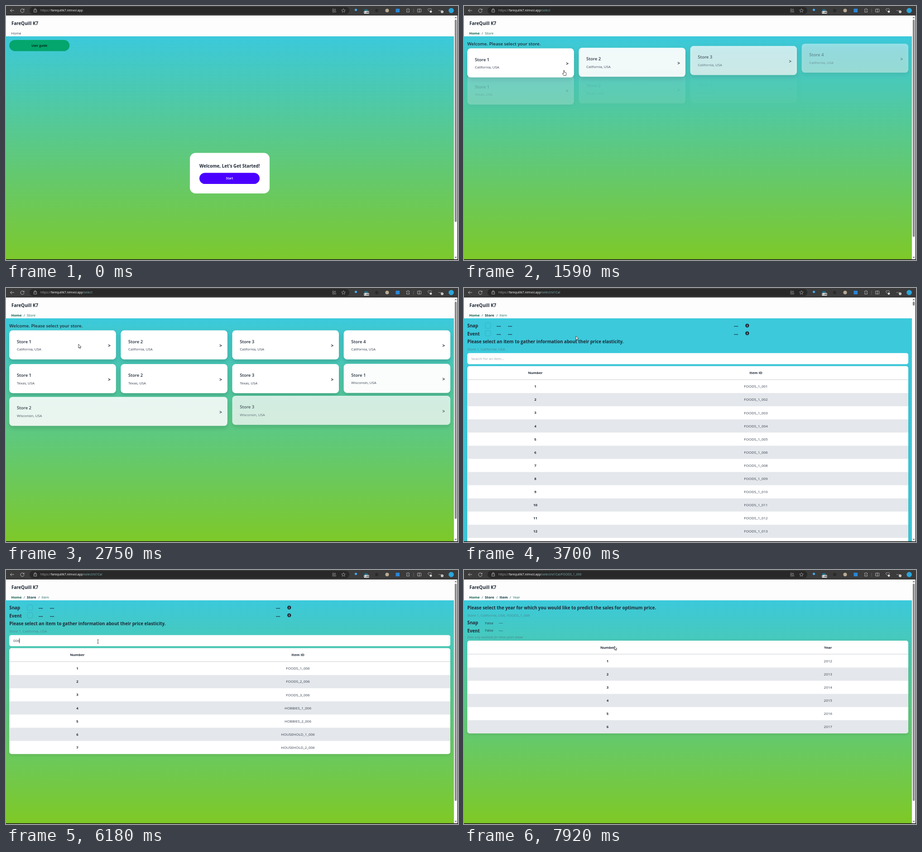
Recreate the animation shown at these times as an HTML page with a canvas. Size 998x561 px, loop 8 s.

```html
<!DOCTYPE html>
<html lang="en">
<head>
<meta charset="utf-8">
<title>Store price demo</title>
<style>
html, body { margin: 0; width: 100%; height: 100%; overflow: hidden; background: #3b3b3b; }
canvas { display: block; }
</style>
</head>
<body>
<canvas id="stage" width="998" height="561"></canvas>
<script>
const c = document.getElementById('stage').getContext('2d');
const LOOP = 8000, INK = '#1f2937', CYAN = '#3bc9db', LIME = '#82c91e', MUTED = '#4b8791';
const BODY = 7.8, TITLE = 9.75, ROW = 29.07;
const SELECT_AT = 980, ITEMS_AT = 3040, YEARS_AT = 7390;

// Text is placed by the middle of its capitals.
function text(s, x, y, size = BODY, color = INK, weight = 400, align = 'left') {
  c.font = `${weight} ${size}px "Open Sans", "Noto Sans", sans-serif`;
  c.textAlign = align;
  c.fillStyle = color;
  c.fillText(s, x, y + size * 0.36);
  return c.measureText(s).width;
}
function rect(x, y, w, h, color) {
  c.fillStyle = color;
  c.fillRect(x, y, w, h);
}
function box(x, y, w, h, r, color) {
  c.beginPath();
  c.roundRect(x, y, w, h, r);
  c.fillStyle = color;
  c.fill();
}
function disc(x, y, r, color) {
  c.beginPath();
  c.arc(x, y, r, 0, 7);
  c.fillStyle = color;
  c.fill();
}
function shape(d, x, y, fill, stroke, width = 0.9) {
  c.save();
  c.translate(x, y);
  const p = new Path2D(d);
  if (fill) { c.fillStyle = fill; c.fill(p); }
  if (stroke) { c.strokeStyle = stroke; c.lineWidth = width; c.stroke(p); }
  c.restore();
}
function withShadow(blur, dy, alpha, draw) {
  c.save();
  c.shadowColor = `rgba(0,0,0,${alpha})`;
  c.shadowBlur = blur;
  c.shadowOffsetY = dy;
  draw();
  c.restore();
}
const smooth = u => { u = Math.min(1, Math.max(0, u)); return u * u * (3 - 2 * u); };

function browserBar(path) {
  const line = '#c8c8c8';
  rect(0, 0, 998, 21, '#3b3b3b');
  box(52, 2, 706, 16, 8, '#282828');
  shape('M4.5 0H-4M-.5-3.5L-4 0L-.5 3.5', 13.5, 10, null, line);
  shape('M3.6-1.5A4 4 0 1 0 4 .8M4-4V-1.2H1.2', 36, 10, null, line);
  shape('M-3-1H3V4H-3ZM-1.6-1V-2.4A1.6 1.6 0 0 1 1.6-2.4V-1M0 1V2', 64.5, 9.5, null, line, 0.8);
  let x = 76;
  x += text('https://', x, 10, 6.8, '#a8a8a8');
  x += text('farequillk7.nimvol.app', x, 10, 6.8, '#fff');
  text(path, x, 10, 6.8, '#7fb0b0');
  shape('M-3.5-3.5H-.5V-.5H-3.5ZM-3.5.8H-.5V3.8H-3.5ZM.8.8H3.8V3.8H.8ZM2.2-4V-.3M.4-2.2H4', 724.5, 10, null, '#8f8f8f', 0.8);
  shape('M0-4.2L1.3-1.4L4.3-1.1L2 .9L2.7 3.9L0 2.3L-2.7 3.9L-2 .9L-4.3-1.1L-1.3-1.4Z', 745, 10, null, '#a8a8a8', 0.8);
  disc(772.5, 8.5, 2.6, '#4aa8e8');
  box(791.5, 7, 7, 5, 0, '#1f6f86');
  box(790.5, 11, 11, 6, 1, '#fff');
  text('1.00', 796, 14.2, 5, '#111', 700, 'center');
  disc(818.5, 10, 3.5, '#2b2b2b');
  disc(841.5, 10, 4, '#b9ab93');
  box(860.5, 6, 8.5, 8, 0, '#2a86d8');
  shape('M-3-3H-1A1.3 1.3 0 0 1 1.6-3H3V-1A1.3 1.3 0 0 0 3 1.6V3.5H-3V1.6A1.3 1.3 0 0 0-3-1Z', 887.5, 10, null, line, 0.8);
  rect(899.5, 6, 1, 9, '#666');
  shape('M-4-3.2H4V3.2H-4ZM0-4.2V4.2', 912.5, 10, null, line, 0.8);
  shape('M0 3L-3.6-.5A2 2 0 0 1 0-2.8A2 2 0 0 1 3.6-.5', 935.5, 9.5, null, line, 0.8);
  disc(938, 12.5, 2.4, '#ddd');
  for (let i = 0; i < 3; i++) disc(956 + i * 2.8, 10, 0.8, line);
  disc(963, 12.8, 2.8, '#eee');
  rect(962.6, 11.2, 0.8, 3, '#333');
  disc(983, 10, 5.8, '#2aa6dc');
}

function frame(path, crumbs, gradientEnd, thumb) {
  browserBar(path);
  rect(0, 21, 998, 540, '#fdfdfd');
  const g = c.createLinearGradient(0, 67, 0, gradientEnd);
  g.addColorStop(0, CYAN);
  g.addColorStop(1, LIME);
  rect(0, 67, 989, 493, g);
  text('FareQuill K7', 12, 38, 9.8, INK, 700);
  crumbs.forEach((name, i) => {
    const x = [11.5, 46, 78.5, 108][i], last = i === crumbs.length - 1;
    if (i) text('/', x - 7, 60.5, BODY, '#245', 400);
    const color = crumbs.length === 1 ? '#374151' : last ? '#176a5c' : i ? '#06343a' : '#0b5a44';
    text(name, x, 60.5, BODY, color, last ? 400 : 700);
  });
  box(990.8, 30, 4.4, thumb, 2.2, '#8a8a8a');
  shape('M-2.6 1.5L0-1.8L2.6 1.5Z', 993, 25.5, '#777');
  shape('M-2.6-1.5L0 1.8L2.6-1.5Z', 993, 555.5, '#777');
}

function button(label, x, y, fill, color) {
  box(x, y, 133, 24.7, 12.3, fill);
  text(label, x + 66.5, y + 12.4, 6.8, color, 600, 'center');
}

function home(t) {
  frame('', ['Home'], 600, 447);
  button('User guide', 7.3, 75, '#04a66d', '#04140e');
  box(406, 324.5, 176, 89.5, 12.5, '#fff');
  text("Welcome, Let's Get Started!", 427, 353, TITLE, INK, 700);
  button('Start', 427, 368.4, t > 620 ? '#3f00db' : '#4a00ff', '#fff');
}

// Every card: label, state, column, row, width, fade start, fade length.
const NARROW = 235.5, WIDE = 481.6;
const cards = [
  [1, 'California', 0, 0, NARROW, 980, 560],
  [2, 'California', 1, 0, NARROW, 980, 730],
  [3, 'California', 2, 0, NARROW, 1040, 840],
  [4, 'California', 3, 0, NARROW, 1120, 1000],
  [1, 'Texas', 0, 1, NARROW, 1240, 1110],
  [2, 'Texas', 1, 1, NARROW, 1370, 1110],
  [3, 'Texas', 2, 1, NARROW, 1470, 1160],
  [1, 'Wisconsin', 3, 1, NARROW, 1530, 1350],
  [2, 'Wisconsin', 0, 2, WIDE, 1640, 1420],
  [3, 'Wisconsin', 2, 2, WIDE, 1765, 1460],
];

function select(t) {
  frame('/select', ['Home', 'Store'], 590, 480);
  text('Welcome. Please select your store.', 7.3, 83, TITLE, INK, 600);
  for (const [n, state, col, row, w, start, length] of cards) {
    const p = smooth((t - start) / length);
    if (!p) continue;
    const x = 7.3 + col * 246.1, y = 93.5 + row * 74.6 - 19 * (1 - p);
    c.globalAlpha = p;
    withShadow(10, 5, 0.16, () => box(x, y, w, 64.2, 7.5, '#fff'));
    text('Store ' + n, x + 16.7, y + 24.6, 9.5, INK, 600);
    text(state + ', USA', x + 16.7, y + 41.8, BODY, '#374151');
    text('>', x + w - 14.7, y + 34, 10, INK, 700, 'center');
    c.globalAlpha = 1;
  }
}

function table(top, heads, centres, rows, hovered) {
  const first = top + 30.4, h = 30.4 + rows.length * ROW;
  withShadow(6, 2, 0.12, () => box(7.3, top, 973.7, h, 5, '#fff'));
  c.save();
  c.beginPath();
  c.roundRect(7.3, top, 973.7, h, 5);
  c.clip();
  rect(7.3, first - 1, 973.7, 1, '#cbced3');
  heads.forEach((s, i) => text(s, centres[i], top + 15, BODY, INK, 700, 'center'));
  rows.forEach((s, i) => {
    const y = first + i * ROW, mid = y + ROW / 2;
    if (i % 2) rect(7.3, y, 973.7, ROW, '#e4e7eb');
    if (i === hovered) rect(7.3, y, 973.7, ROW, '#f2f2f2');
    text(i + 1, centres[0], mid, BODY, INK, 700, 'center');
    text(s, centres[1], mid, 8, '#374151', 400, 'center');
  });
  c.restore();
}

const id = (group, n) => `${group}_${String(n).padStart(3, '0')}`;
const firstItems = [1, 2, 3, 4, 5, 6, 8, 9];
const groups = ['FOODS_1', 'FOODS_2', 'FOODS_3', 'HOBBIES_1', 'HOBBIES_2', 'HOUSEHOLD_1', 'HOUSEHOLD_2'];
function matches(query) {
  if (query === '006') return groups.map(g => id(g, 6));
  if (query === '00') {
    return [...firstItems, 100, 200].map(n => id('FOODS_1', n))
      .concat(firstItems.slice(0, 3).map(n => id('FOODS_2', n)));
  }
  return [...firstItems, 10, 11, 12, 13, 14].map(n => id('FOODS_1', n));
}

function caretOn(t) {
  if (t < 4400) return false;
  const since = t < 5260 ? 4400 : t < 5390 ? 5260 : t < 5720 ? 5390 : 5720;
  return Math.floor((t - since) / 530) % 2 === 0;
}

function items(t) {
  const query = t < 5260 ? '' : t < 5390 ? '0' : t < 5720 ? '00' : '006';
  const [end, thumb] = { '00': [2400, 120], '006': [580, 480] }[query] || [90000, 9];
  frame('/select/st1Cal', ['Home', 'Store', 'Item'], end, thumb);
  [['Snap', 83, 83], ['Event', 101, 100]].forEach(([label, y, mid]) => {
    text(label, 7.3, y, TITLE, INK, 700);
    c.strokeStyle = 'rgba(31,90,120,.25)';
    c.lineWidth = 0.8;
    c.beginPath();
    c.roundRect(47, mid - 6, 12, 12, 3);
    c.stroke();
    for (const x of [72, 97, 596]) text('---', x, y + 0.5, TITLE, INK, 700);
    disc(625.3, mid, 4.2, INK);
    rect(624.8, mid - 0.7, 1, 3, '#fff');
    rect(624.8, mid - 2.4, 1, 1, '#fff');
  });
  text('Please select an item to gather information about their price elasticity.', 7.3, 118, TITLE, INK, 700);
  text('Store 1, California, USA', 7.3, 135.3, BODY, MUTED);
  box(7.3, 143.7, 973.7, 24.6, 4.2, '#fff');
  const w = query ? text(query, 16, 156.5, BODY, '#374151') : 0;
  if (!query) text('Search for an item...', 16, 156.5, BODY, '#9ca3af');
  if (caretOn(t)) rect(16 + w, 151, 0.9, 10.5, '#111');
  table(172.6, ['Number', 'Item ID'], [157.5, 644.5], matches(query), t > 6420 ? 0 : -1);
}

function years() {
  frame('/select/st1Cal/FOODS_1_006', ['Home', 'Store', 'Item', 'Year'], 580, 480);
  text('Please select the year for which you would like to predict the sales for optimum price.', 7.3, 83, TITLE, INK, 700);
  text('Store 1, California, USA, FOODS_1_006', 7.3, 100, BODY, MUTED);
  [['Snap', 116.5, 117], ['Event', 134.5, 133.3]].forEach(([label, y, mid]) => {
    text(label, 7.3, y, TITLE, INK, 700);
    text('False', 46.5, mid, BODY, '#25404c');
    text('---', 77, mid, BODY + 1.5, '#25404c');
  });
  text('Data only available for these years below', 7.3, 149, 6.8, MUTED, 'italic 400');
  table(156, ['Number', 'Year'], [317, 803.7], [2012, 2013, 2014, 2015, 2016, 2017], -1);
}

// Pointer stops: time, x, y, and the look kept until the next stop.
const stops = [
  [120, 902, 466, 'arrow'], [380, 700, 294, 'arrow'], [640, 530, 372, 'hand'], [850, 515, 366, 'hand'],
  [980, 515, 366, 'arrow'], [1240, 330, 230, 'arrow'], [1450, 219, 142, 'hand'], [1800, 224, 143, 'hand'],
  [2130, 502, 172, 'hand'], [2350, 470, 165, 'hand'], [2680, 190, 126, 'arrow'], [2750, 160, 124, 'arrow'],
  [2950, 188, 132, 'hand'], [3040, 188, 132, 'arrow'], [3360, 188, 132, 'arrow'], [3700, 247, 106, 'arrow'],
  [3900, 268, 122, 'arrow'], [4110, 206, 143, 'beam'], [4400, 203, 158, 'beam'], [6180, 203, 158, 'beam'],
  [6400, 240, 200, 'hand'], [6530, 247, 204, 'hand'], [7390, 247, 204, 'arrow'], [7560, 247, 204, 'arrow'],
  [7920, 332, 168, 'arrow'], [8000, 332, 168, 'arrow'],
];
const looks = {
  arrow: 'M0 0V8.6L1.9 6.8L3.2 9.7L4.6 9.1L3.3 6.3H5.9Z',
  hand: 'M-.9 .6A.9 .9 0 0 1 .9 .6V4L4.3 4.7Q5.3 5 5.2 6.2L4.4 11.2H-.8L-3.3 7.2Q-3.6 6-2.4 6.1L-.9 7.2Z',
  beam: 'M-1.8-4H-.5L0-3.6L.5-4H1.8M0-3.6V3.6M-1.8 4H-.5L0 3.6L.5 4H1.8',
};
function pointer(t) {
  const i = stops.findIndex(s => s[0] > t) - 1;
  if (i < 0) return;
  const [t0, x0, y0, look] = stops[i], [t1, x1, y1] = stops[i + 1];
  const u = smooth((t - t0) / (t1 - t0));
  shape(looks[look], x0 + (x1 - x0) * u, y0 + (y1 - y0) * u, look === 'beam' ? null : '#fff', '#222', 0.8);
}

function windowEdge() {
  rect(996.6, 21, 1.4, 540, '#3a3a3a');
  rect(0, 559.4, 998, 1.6, '#1c1d1a');
}

function draw() {
  const t = performance.now() % LOOP;
  c.clearRect(0, 0, 998, 561);
  if (t < SELECT_AT) home(t);
  else if (t < ITEMS_AT) select(t);
  else if (t < YEARS_AT) items(t);
  else years();
  pointer(t);
  windowEdge();
  requestAnimationFrame(draw);
}
draw();
</script>
</body>
</html>
```
